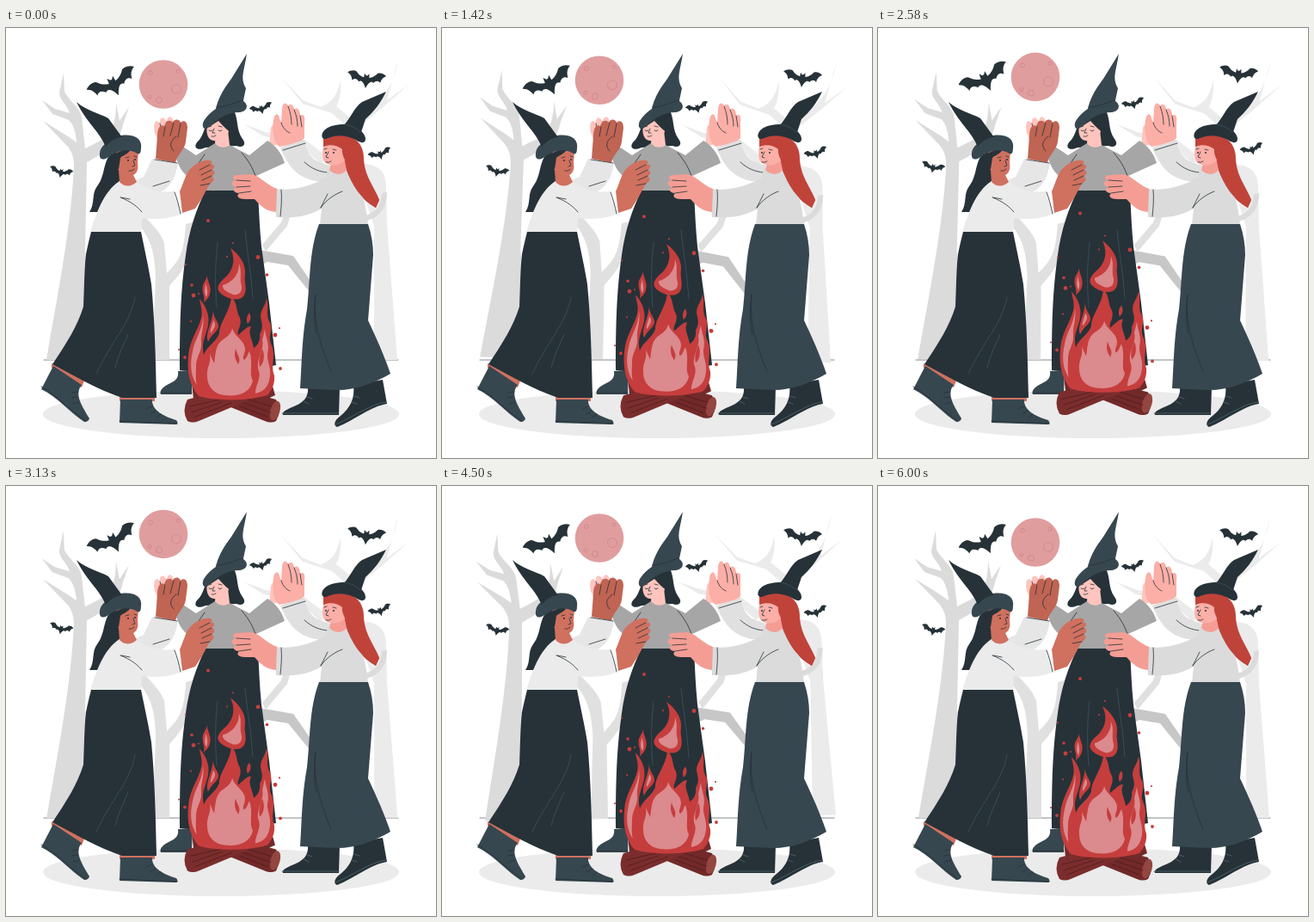
An HTML page that plays this animation: 500x500 px, repeating every 6040 ms.

```html
<!DOCTYPE html>
<html lang="en">
<head>
<meta charset="utf-8">
<title>Witches around a fire</title>
<style>
html, body { margin: 0; width: 100%; height: 100%; overflow: hidden; background: #fff; }
svg { display: block; width: 100%; height: 100%; }
.ink { fill: #263238; }
.slate { fill: #37474f; }
.tan { fill: #d0705f; }
.tanDark { fill: #c06453; }
.pink { fill: #ffc4bd; }
.peach { fill: #fbafa7; }
.rose { fill: #f49d94; }
.ginger { fill: #c0433a; }
.red { fill: #c63d3d; }
.glow { fill: #db8a8d; }
.line { fill: none; stroke: #263238; stroke-width: .8; stroke-linecap: round; }
.soft { stroke: #3f535d; }
.bark { stroke: #501c1c; }
</style>
</head>
<body>
<svg viewBox="0 0 500 500">
  <defs>
    <path id="bat" class="ink" d="M-29-8C-26-11-20-13-16-11C-13-7-9-4-4-3L-3.500-9L-1-6H1L3.500-9L4-3C9-4 13-7 16-11C20-13 26-11 29-8C24-6 22-2 21 3C18-1 14 0 11 4C8 1 4 3 0 13C-4 3-8 1-11 4C-14 0-18-1-21 3C-22-2-24-6-29-8Z"/>
  </defs>

  <ellipse cx="250" cy="449" rx="207" ry="28" fill="#ebebeb"/>
  <path class="line" d="M44 386H456" stroke-opacity=".7"/>

  <g id="moon">
    <circle cx="183" cy="65.500" r="28.300" fill="#e09d9e"/>
    <g fill="none" stroke="#cf8488" stroke-width=".8">
      <circle cx="198" cy="71" r="5.500"/>
      <circle cx="168" cy="52" r="2.500"/>
      <circle cx="178" cy="84" r="3.500"/>
      <circle cx="200" cy="50" r="2"/>
      <circle cx="167" cy="80" r="2"/>
    </g>
  </g>

  <g id="trees">
    <g fill="#ebebeb">
      <path d="M320 57L345 84L366 92C382 85 386 75 389 60C390 76 388 84 384 91L402 106L396 114L379 99L345 88Z"/>
      <path d="M456 36C452 60 444 76 430 88L408 104L414 112L436 94L469 65L443 84Z"/>
      <path d="M277 112L302 121L345 128L374 150L366 158L340 134L300 126Z"/>
      <path d="M405 158C430 156 442 164 442 185L443 230L455 386H428V230L415 190Z"/>
    </g>
    <path fill="#e0e0e0" d="M170 386L174 290C173 254 165 240 150 224L158 216C172 230 181 240 184 250L187 285C202 270 207 262 209 228L217 226C217 262 212 276 190 300V386Z"/>
    <path fill="#dbdbdb" d="M418 218C432 214 436 205 437 192L443 191C443 208 436 219 420 224Z"/>
    <path fill="#c7c7c7" d="M292 258L306 260L334 265L354 294V308L328 276L304 272L292 278Z"/>
    <path fill="#e0e0e0" d="M298 252L320 226L332 192L338 193L327 230L302 260Z"/>
    <path fill="#dbdbdb" d="M47 386C60 310 76 230 79 160C79 150 76 142 70 136L43 108L72 126L82 133C81 120 78 112 73 107L54 100L42 84L57 94L74 99C72 90 62 84 62 75L67 52L68 74C74 86 86 92 88 104L92 140L104 134C123 125 128 112 128 87L132 108L143 92L136 112C132 134 115 145 94 156L92 260L104 386Z"/>
  </g>

  <g id="bats">
    <use href="#bat" transform="translate(125 66) rotate(-26) scale(1.060)"/>
    <use href="#bat" transform="translate(419 60) rotate(6) scale(.78)"/>
    <use href="#bat" transform="translate(297 94) rotate(-15) scale(.47)"/>
    <use href="#bat" transform="translate(64 168) rotate(12) scale(.48)"/>
    <use href="#bat" transform="translate(435 147) rotate(-17) scale(.48)"/>
  </g>

  <!-- middle witch -->
  <g>
    <path class="slate" d="M200 399L217 398L216 426H180C178 421 183 417 191 413C198 410 201 406 200 399Z"/>
    <path class="line" d="M180 424H216"/>
    <path class="ink" d="M237 106C229 116 231 125 222 133C217 140 224 143 232 139L250 138L268 137C276 140 280 135 275 129C267 118 271 106 264 94Z"/>
    <path class="pink" d="M173 122C171 112 173 108 176 108L179 111C178 105 182 103 185 106L187 109C187 103 192 101 194 106L196 111C198 106 202 107 202 112L199 128L178 134Z"/>
    <path class="line" d="M179 111L181 120M187 109L188 119"/>
    <path class="pink" d="M306 138L308 116C310 111 313 111 314 116L316 130L322 134Z"/>
    <path fill="#a6a6a6" d="M243 134L260 136L283 148L304 131C313 136 321 146 324 157L291 172L293 191H232L233 174L216 176C206 170 200 161 197 148L206 138L221 148Z"/>
    <path class="line" d="M274 145C282 154 287 163 290 172M231 147L222 160"/>
    <path class="pink" d="M244 124L243 134C248 140 256 140 260 136L258 119Z"/>
    <path class="pink" d="M237 106C233 114 232 122 236 128C242 135 256 130 259 120L260 104Z"/>
    <path class="ink" d="M245 96L264 93C269 106 266 118 264 124C258 119 252 114 247 108L236 115C236 106 240 100 245 96Z"/>
    <path class="line" d="M236 115l3-1M247 114l4 1M236 119q2 2 4 0M247 119q2 2 4 0M242 117L240 122L243 122M239 126q3 1 5-1"/>
    <path class="slate" d="M244 94C254 88 268 82 276 85C283 90 280 97 272 98C257 98 245 106 235 116C230 120 227 114 230 108C234 102 238 98 244 94Z"/>
    <path class="slate" d="M280 30C277 50 272 58 279 70L275 89C263 91 252 94 243 99C246 79 257 66 262 59Z"/>
    <path class="line" d="M245 92C254 92 266 87 275 84"/>
    <path class="ink" d="M232 189H293C294 212 295 234 297 254L306 320L314 392C278 400 238 402 202 398C202 330 204 300 209 264C213 235 221 211 232 189Z"/>
    <path class="line soft" d="M246 250C243 275 243 300 245 325M278 235C281 265 285 285 287 315"/>
  </g>

  <!-- left witch -->
  <g>
    <path class="tan" d="M53 390L91 410L88 418L53 395ZM132 428H173V434H132Z"/>
    <path class="slate" d="M55 393L88 415C80 425 86 436 97 454Q96 458 91 458C74 447 60 429 41 420Z"/>
    <path class="slate" d="M133 432H170C169 445 185 452 198 456Q201 460 198 461L132 459Z"/>
    <path class="line" d="M41 417C60 428 74 444 93 457M132 457L199 460M84 423l-7 1M83 429l-7 1M85 435l-7 2M170 440l-7 3M174 445l-6 4M180 449l-5 4"/>
    <path class="ink" d="M127 141C111 153 117 170 106 184C99 193 104 203 97 214H107C112 203 118 194 129 183L139 165Z"/>
    <path class="tanDark" d="M174 152L176 125C176 116 180 111 184 114C186 107 191 106 194 110C196 105 202 106 203 110C207 106 211 109 211 116L209 132C208 142 199 146 197 157Z"/>
    <path class="line" d="M185 115L183 126M195 110L191 125M203 111L200 127M198 126C190 132 190 138 195 143"/>
    <path fill="#e6e6e6" d="M144 180L160 173L170 152L200 157C197 173 193 183 181 190L150 197Z"/>
    <path class="line" d="M173 153L199 157M171 184L190 178"/>
    <path fill="#ebebeb" d="M132 178L151 178C164 188 178 192 196 190L204 216C190 222 174 223 158 221L157 238H98C104 218 113 190 132 178Z"/>
    <path class="line" d="M133 197C146 202 153 208 158 214M134 197L144 199M196 191C199 198 201 207 203 216"/>
    <path class="tan" d="M202 190C207 179 209 168 216 162C224 155 232 153 237 154C241 155 240 158 236 159C243 157 244 162 239 165C244 166 243 171 239 172C243 174 242 179 237 181C232 190 226 202 220 210L205 215Z"/>
    <path class="line" d="M237 159L225 165M239 165L227 171M239 172L228 177M237 181L226 183"/>
    <path class="tan" d="M131 166L132 179C138 186 147 184 152 179L147 169Z"/>
    <path class="tan" d="M128 145C125 158 130 169 140 172C150 174 155 166 153 157L154 142L140 138Z"/>
    <path class="ink" d="M122 148L146 138C145 146 137 147 133 151L131 164C124 164 122 156 122 148Z"/>
    <path class="line" d="M139 151l4-1M149 149l3 1M148 154L150 160L147 161M143 166q4 1 6-2"/>
    <circle class="ink" cx="142" cy="154" r="1"/><circle class="ink" cx="150" cy="153" r="1"/>
    <path class="slate" d="M115 135C121 130 128 126 134 125C149 123 159 129 157 140C157 146 155 148 151 145C140 139 128 144 119 150C112 155 108 152 109 146C109 142 111 138 115 135Z"/>
    <path class="ink" d="M82 86C93 96 108 99 119 105L135 127C128 127 121 132 116 138C107 118 95 112 82 86Z"/>
    <path class="ink" d="M99 237H157C161 257 166 279 169 298C173 340 174 384 175 430H135C106 420 80 405 54 391C70 367 83 347 90 324C91 302 91 281 93 263C95 253 97 245 99 237Z"/>
    <path class="line soft" d="M150 313C144 345 122 365 105 402M142 356C136 370 130 382 127 395"/>
  </g>

  <!-- right witch -->
  <g>
    <path class="ink" d="M351 418H388L387 450H322C320 446 328 443 337 439C346 435 352 429 351 418Z"/>
    <path class="ink" d="M404 415L438 409L443 437C424 440 407 455 385 464C380 462 382 456 389 451C400 442 406 431 404 415Z"/>
    <path class="line" style="stroke:#526570" d="M321 448H387M383 461C405 452 424 437 442 435M350 429l6 2M346 434l6 3M405 428l6 2M402 435l6 2"/>
    <path class="peach" d="M318 138C311 133 309 119 311 107C312 99 317 98 318 105L320 110L321 94C322 86 326 86 328 91C331 86 335 90 335 95C339 91 342 96 342 102C347 99 348 104 347 111L347 128L340 134Z"/>
    <path class="line" d="M328 91C331 99 332 105 332 112M335 95C338 102 339 108 339 114M342 102L344 115M320 110C322 117 326 120 330 122"/>
    <path fill="#e0e0e0" d="M319 139L347 130C349 145 356 154 368 157L386 163L386 180L360 178C341 174 329 164 319 139Z"/>
    <path class="line" d="M322 142L348 134M347 156C356 164 364 167 374 168"/>
    <path class="ginger" d="M388 124C406 124 417 136 416 154C418 174 428 184 434 200L430 209C414 200 400 184 394 162Z"/>
    <path fill="#dbdbdb" d="M374 163L395 163C411 177 418 198 421 229H365L367 210C350 220 333 221 314 220L313 187C333 190 354 184 372 174Z"/>
    <path class="ginger" d="M394 160L412 152C416 174 428 184 434 200L430 209C414 200 402 184 394 160Z"/>
    <path class="line" d="M320 188C321 199 320 209 319 219M366 209C373 199 383 193 391 190M366 209L374 193"/>
    <path class="rose" d="M315 187C302 182 296 172 285 170L269 171C263 171 262 176 268 177C260 178 261 184 268 185C262 187 265 192 271 192C267 196 271 199 278 199L289 199C295 206 302 213 314 214Z"/>
    <path class="line" d="M268 177L284 178M268 185L284 184M271 192L285 190"/>
    <path class="rose" d="M379 154L376 165C383 172 392 171 396 165L393 150Z"/>
    <path class="peach" d="M371 131C368 139 367 149 370 155C376 163 392 160 397 150L395 132Z"/>
    <path class="ginger" d="M369 126C380 121 394 120 402 127L401 158L395 158C395 153 390 148 391 141C385 136 377 135 369 138Z"/>
    <path class="line" d="M370 141l3-1M380 141l4 1M375 144L372 150L375 151M372 156q4 1 6-1"/>
    <circle class="ink" cx="372" cy="145" r="1"/><circle class="ink" cx="381" cy="145" r="1"/>
    <path class="ink" d="M392 112C402 112 413 117 417 125C420 132 416 135 410 132C398 124 384 123 372 129C365 130 366 120 374 116C380 113 386 112 392 112Z"/>
    <path class="ink" d="M442 74C436 87 427 98 418 106L412 124L391 115C402 104 404 93 414 86Z"/>
    <path class="line soft" d="M393 112C401 113 408 117 412 121"/>
    <path class="slate" d="M364 228H421C425 240 427 252 427 264L421 340C430 359 440 381 447 402C428 413 407 421 385 421L342 419C344 387 344 360 350 327C354 294 352 260 364 228Z"/>
    <path class="line" d="M360 310C357 342 365 368 378 399M360 310C357 330 359 345 361 356"/>
  </g>

  <g id="fire">
    <path fill="#722a2a" d="M216 412L226 408L235 430L218 431ZM299 418L309 413L313 427L300 433Z"/>
    <path fill="#722929" d="M314 432L262 418L222 425L301 457Q308 460 314 457Q321 445 314 432Z"/>
    <path fill="#7b2d2d" d="M211 432L262 418L303 424L224 457Q217 460 211 457Q204 445 211 432Z"/>
    <ellipse cx="313" cy="445" rx="5.500" ry="11.500" transform="rotate(16 313 445)" fill="#944640"/>
    <path class="line bark" d="M214 440L270 427M216 447L251 435M220 452L262 436M308 440L282 432M308 447L276 436M304 452L272 440"/>

    <path class="red" d="M224 428C211 412 210 394 213 374C216 360 224 349 227 337C229 329 226 322 225 315C234 325 238 337 234 350C231 361 227 366 230 380C234 369 244 366 248 355C248 342 261 330 262 312C270 321 267 329 272 337C275 346 268 351 270 357C276 352 280 347 285 347C281 356 286 360 288 372C293 369 296 363 295 356C300 348 297 342 296 336C296 327 302 323 303 314C306 325 302 332 306 341C312 350 304 358 308 367C315 381 307 391 312 404C313 414 309 421 304 427C280 434 246 434 224 428Z"/>
    <path class="red" d="M241 327C240 337 248 341 247 348C245 354 239 356 235 365C231 354 240 344 241 327Z"/>
    <path class="red" d="M261 256C271 263 279 274 278 286C276 294 282 304 276 312C271 318 258 316 249 308C243 302 248 296 256 289C263 282 268 271 261 256Z"/>
    <path class="glow" d="M271 274C275 284 271 290 274 300C275 308 270 311 264 310C256 307 251 303 252 299C262 296 271 288 271 274Z"/>
    <path class="red" d="M234 286C233 295 240 300 237 309C236 315 231 317 230 320C232 311 227 307 229 299C231 294 234 291 234 286ZM283 331C286 337 284 341 281 344C279 339 280 335 283 331Z"/>
    <path class="glow" d="M233 297C233 303 236 306 233 313C230 308 231 302 233 297Z"/>
    <path class="glow" d="M263 349C266 360 277 362 278 373C278 379 274 383 277 386C281 383 281 378 283 376C288 389 282 402 287 410C284 425 269 429 254 427C243 426 234 418 234 405C233 394 239 390 237 379L242 390C244 379 243 371 250 364C257 359 262 356 263 349Z"/>
    <path class="red" d="M267 373C269 381 274 384 270 391C266 385 265 380 267 373Z"/>
    <path class="glow" d="M229 334C231 348 226 355 227 366C228 376 222 380 221 392C221 402 220 408 222 415C214 404 214 389 217 376C219 362 229 352 229 334ZM241 340C246 345 241 351 238 355C237 350 240 346 241 340Z"/>
    <path class="glow" d="M301 350C302 361 307 367 304 379C303 388 310 396 306 410C304 418 299 423 290 425C290 414 298 407 293 396C291 385 301 373 298 363Z"/>
    <path class="red" d="M298 373C302 382 299 391 295 394C293 385 296 380 298 373Z"/>
    <g id="sparks" class="red"></g>
  </g>
</svg>
<script>
const el = id => document.getElementById(id);

const sparks = [
  [235, 224, 2], [264, 250, 1], [257, 266, 1], [293, 266.5, 2.4], [303.5, 287, 1.8],
  [216, 299, 1.8], [218, 311, 2.4], [224, 309, 1], [215, 341, 1], [209, 275, 1],
  [313, 357, 2.4], [318, 349, 1.1], [319, 396, 1.9], [208, 383, 1.9], [201, 374, 1]
];
el("sparks").innerHTML = sparks
  .map(([x, y, r]) => `<circle cx="${x}" cy="${y}" r="${r}"/>`).join("");

// Triangle wave: 0 at the ends of a period, 1 in its middle.
const wave = (t, period) => 1 - Math.abs(1 - 2 * (t % period) / period);
const lift = (id, y) => el(id).setAttribute("transform", `translate(0 ${-y})`);

const start = performance.now();
function draw(now) {
  const t = Math.max(0, now - start) % 6040;
  lift("moon", 10 * wave(t, 6000));
  lift("fire", 10 * wave(t, 6000));
  lift("bats", 10 * wave(t, 1500));
  const sway = 2 * wave(t + 1500, 6000) - 1;
  el("trees").setAttribute("transform", `rotate(${sway} 255 212)`);
  requestAnimationFrame(draw);
}
draw(start);
</script>
</body>
</html>
```
